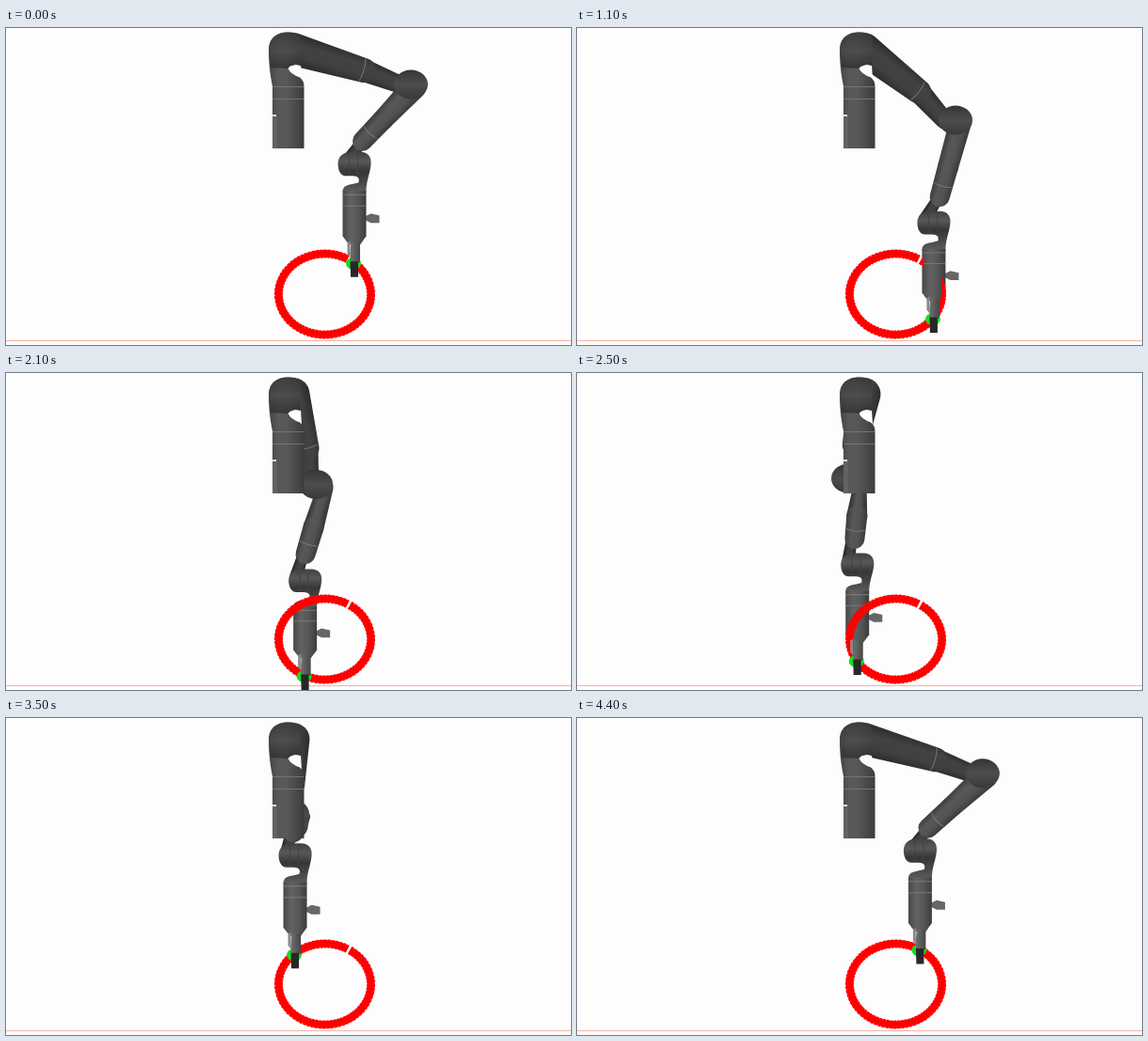
Animation of 600x337 px, one loop 4500 ms. Source, as an HTML page with a canvas:

```html
<!DOCTYPE html>
<html lang="en">
<head>
<meta charset="utf-8">
<title>Robot arm tracing a circle</title>
<style>
html, body { margin: 0; width: 100%; height: 100%; overflow: hidden; background: #fefdfe; }
canvas { display: block; }
</style>
</head>
<body>
<canvas id="stage" width="600" height="337"></canvas>
<script>
const ctx = document.getElementById('stage').getContext('2d');
const STEPS = 45, STEP_MS = 100, PAPER = '#fefdfe';
const RING = { x: 338.5, y: 283, rx: 49, ry: 43 };
const SHOULDER = [305, 22.5];
const DARK = ['#2c2c2c', '#424242', '#404040', '#2a2a2a'];
const LIGHT = ['#393939', '#525252', '#585858', '#3c3c3c'];

// Elbow path: step, x, y
const ELBOW = [
  [0, 430, 60], [4, 430, 65], [11, 402, 98], [17, 366, 119.5], [25, 288, 112],
  [29, 242, 100], [32, 264, 97], [35, 304, 102], [38, 374, 72], [41, 427, 58]
];

// Smooth closed curve through the elbow keys
function elbowAt(n) {
  const count = ELBOW.length;
  const key = i => {
    const [s, x, y] = ELBOW[(i + count) % count];
    return [s + STEPS * Math.floor(i / count), x, y];
  };
  let i = count - 1;
  while (ELBOW[i][0] > n) i--;
  const [a, b, c, d] = [key(i - 1), key(i), key(i + 1), key(i + 2)];
  const span = c[0] - b[0], u = (n - b[0]) / span;
  return [1, 2].map(k => {
    const m0 = (c[k] - a[k]) / (c[0] - a[0]) * span;
    const m1 = (d[k] - b[k]) / (d[0] - b[0]) * span;
    const u2 = u * u, u3 = u2 * u;
    return (2 * u3 - 3 * u2 + 1) * b[k] + (u3 - 2 * u2 + u) * m0 +
           (3 * u2 - 2 * u3) * c[k] + (u3 - u2) * m1;
  });
}

function shade(x0, y0, x1, y1, ...colors) {
  const g = ctx.createLinearGradient(x0, y0, x1, y1);
  colors.forEach((c, i) => g.addColorStop(i / (colors.length - 1), c));
  return g;
}

function fill(path, style) {
  ctx.fillStyle = style;
  ctx.fill(new Path2D(path));
}

function line(path, style, width = 1) {
  ctx.strokeStyle = style;
  ctx.lineWidth = width;
  ctx.stroke(new Path2D(path));
}

const mix = (a, b, u) => [a[0] + (b[0] - a[0]) * u, a[1] + (b[1] - a[1]) * u];

// Tapered round-ended link, with an optional seam at a fraction of its length
function limb(a, ra, b, rb, colors, seam) {
  const dx = b[0] - a[0], dy = b[1] - a[1], len = Math.hypot(dx, dy);
  ctx.save();
  ctx.translate(...a);
  ctx.rotate(Math.atan2(dy, dx));
  ctx.beginPath();
  ctx.arc(0, 0, ra, Math.PI / 2, Math.PI * 1.5);
  ctx.arc(len, 0, rb, -Math.PI / 2, Math.PI / 2);
  ctx.closePath();
  ctx.fillStyle = shade(0, -ra, 0, ra, ...colors);
  ctx.fill();
  if (seam) {
    const r = ra + (rb - ra) * seam - 1;
    line(`M${len * seam} ${-r}Q${len * seam + 3} 0 ${len * seam} ${r}`, '#777');
  }
  ctx.restore();
}

function drawArm([ex, ey], [tx, ty]) {
  const mid = mix(SHOULDER, [ex, ey], 0.6);
  const side = 12 * Math.tanh((ex - SHOULDER[0]) / 40);
  limb(mid, 12, [ex - side, ey], 9.5, DARK);
  limb(SHOULDER, 17.5, mid, 13, DARK, 0.98);

  // The forearm turns edge-on as the elbow swings to the left
  const turn = 430 - ex;
  const start = [ex + 3 + turn * 0.07, ey + 3];
  const end = [tx + 9 - turn * 0.08, ty - 129];
  const knee = mix(start, end, 0.6);
  limb([end[0] - 4, end[1] + 5], 6, [tx - 9, ty - 105], 7, DARK);
  limb(start, 13 - turn * 0.045, knee, 11, LIGHT);
  limb(knee, 11, end, 10.5, LIGHT, 0.6);
  ctx.beginPath();
  ctx.ellipse(ex, ey, 18, 15.5, 0, 0, 7);
  ctx.fillStyle = shade(ex, ey - 16, ex, ey + 16, '#343434', '#4d4d4d', '#383838');
  ctx.fill();
}

function drawBase() {
  fill('M299 43Q305 38 313 39L314 55L304 52Z', PAPER);
  fill('M283 128V62C281 52 279 40 279 24C279 10 288 4.5 300 4.5Q309 4.5 313 9L313 40' +
       'Q303 37 299.5 43Q302 49 312 52.5Q316.5 56 316.5 62V128Z',
       shade(279, 0, 317, 0, '#424242', '#585858', '#585858', '#4a4a4a', '#3a3a3a'));
  fill('M279 24C279 10 288 4.5 300 4.5Q309 4.5 313 9L313 40Q303 37 299.5 43L281 42Z',
       shade(0, 5, 0, 43, '#303030aa', '#484848aa', '#262626aa'));
  line('M283 62.5H316M283 75.5H316', '#737373');
  fill('M283 93H288V128H283Z', '#626262');
  fill('M282 92H287V94H282Z', '#ddd');
}

function drawBody() {
  fill('M-12 -76V-28L-5 -19H6.5L13 -28V-76Z',
       shade(-12, 0, 13, 0, '#484848', '#626262', '#565656', '#3c3c3c'));
  line('M-12 -72H13M-12 -60H13', '#7a7a7a');
}

function drawHand() {
  fill('M-17 -105C-17 -113 -11 -117.5 -2 -117.5H7C15 -117.5 19 -112 18 -104' +
       'C17 -94 13 -87 13 -75H-12C-12 -83 -5 -82 5 -85Q7 -92 -1 -92H-9C-14 -92 -17 -98 -17 -105Z',
       shade(0, -118, 0, -76, '#404040', '#585858', '#363636', '#454545', '#5a5a5a'));
  line('M-5 -117V-94M4 -117V-94', '#444');
  fill('M12 -49L18 -52L27 -50V-42H18L12 -45Z', '#666');
  drawBody();
}

function drawRing() {
  const ring = (width, dash) => {
    ctx.beginPath();
    ctx.ellipse(RING.x, RING.y, RING.rx, RING.ry, 0, -0.995, -1.055 + Math.PI * 2);
    ctx.setLineDash(dash);
    ctx.lineWidth = width;
    ctx.stroke();
    ctx.setLineDash([]);
  };
  ctx.strokeStyle = '#fe0000';
  ring(7.6, []);
  ring(9, [3, 1]);
}

function drawGripper() {
  ctx.beginPath();
  ctx.ellipse(-0.5, 1, 8, 6.5, 0, 0, 7);
  ctx.fillStyle = '#16dc22';
  ctx.fill();
  fill('M-7 -21L-4 -23V-5L-7 -9Z', '#8a8a8a');
  fill('M-3 -22H5L6.5 -20V0H-4V-10Z', shade(-4, 0, 6, 0, '#707070', '#5c5c5c', '#494949'));
  fill('M-4 -1H4.5V15.5H-3.5Z', '#272727');
}

function at(point, scale, draw) {
  ctx.save();
  ctx.translate(...point);
  ctx.scale(1, scale);
  draw();
  ctx.restore();
}

function draw(n) {
  const angle = (n * 8 - 51.5) * Math.PI / 180;
  const tip = [339 + RING.rx * Math.cos(angle), RING.y + RING.ry * Math.sin(angle)];
  const squash = 1 - (tip[1] - 250) * 0.00055;
  ctx.fillStyle = PAPER;
  ctx.fillRect(0, 0, 600, 337);
  line('M0 332.5H600', '#f7b5a2');
  drawArm(elbowAt(n), tip);
  drawBase();
  at(tip, squash, drawHand);
  drawRing();
  // On the right the hand leans out in front of the ring, except at its edges
  if (tip[0] > RING.x + 20) at(tip, squash, () => {
    ctx.beginPath();
    ctx.rect(-10, -76, 19, 56);
    ctx.clip();
    drawBody();
  });
  at(tip, 1, drawGripper);
}

function tick() {
  draw(Math.floor(performance.now() / STEP_MS) % STEPS);
  requestAnimationFrame(tick);
}
tick();
</script>
</body>
</html>
```
